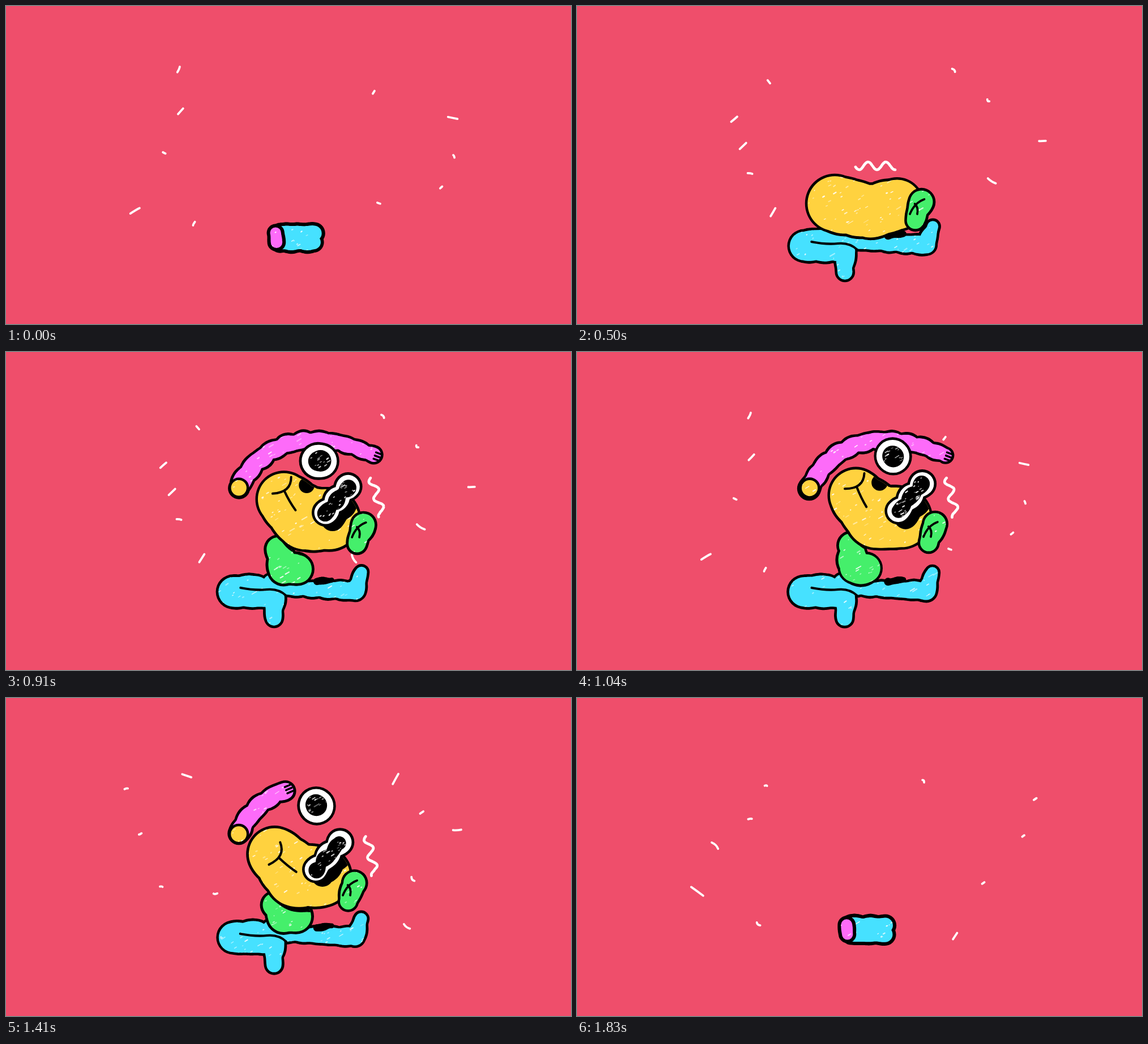
These frames come from a looping animation (998x561 px, 1870 ms). An HTML page with a canvas:

```html
<!DOCTYPE html>
<html lang="en">
<head>
<meta charset="utf-8">
<title>Unfolding doodle</title>
<style>
  html, body { margin: 0; width: 100%; height: 100%; overflow: hidden; background: #ef4e6b; }
  canvas { display: block; width: 998px; height: 561px; }
</style>
</head>
<body>
<canvas id="stage" width="998" height="561"></canvas>
<script>
const g = document.getElementById('stage').getContext('2d');
const LOOP = 1870, FRAME = 1000 / 24;
const BACK = '#ef4e6b', CYAN = '#46e1ff', YELLOW = '#ffd23f', GREEN = '#45ef6b', PINK = '#fd6bf9';
let frame = 0;

const mix = (a, b, u) => Array.isArray(a) ? a.map((v, i) => mix(v, b[i], u)) : a + (b - a) * u;
const linear = (from, to) => Math.max(0, Math.min(1, (frame - from) / (to - from)));
const ease = (from, to) => { const u = linear(from, to); return u * u * (3 - 2 * u); };
const shift = (joints, dx, dy) => joints.map(([x, y, ...r]) => [x + dx, y + dy, ...r]);
const scale = (joints, cx, cy, k) => joints.map(([x, y, r]) => [mix(cx, x, k), mix(cy, y, k), r * k]);

function random(seed) {
  return () => {
    seed = (seed + 0x6d2b79f5) | 0;
    let t = Math.imul(seed ^ (seed >>> 15), 1 | seed);
    t = (t + Math.imul(t ^ (t >>> 7), 61 | t)) ^ t;
    return ((t ^ (t >>> 14)) >>> 0) / 4294967296;
  };
}

// Every part is a chain of joints [x, y, radius]; head parts have low, front and raised poses.
const FRONT_LEG = [[401, 423, 28], [440, 422, 30], [474, 432, 20], [473, 470, 15]];
const BACK_LEG = [[470, 410, 20], [525, 418, 14], [617, 421, 18], [628, 389, 12]];
const HEAD = [
  [[456, 349, 51], [518, 363, 48], [566, 350, 46]],
  [[479, 316, 56], [522, 323, 60], [555, 320, 54]],
  [[492, 253, 48], [530, 291, 57], [573, 293, 54]]
];
const EAR = [[[608, 345]], [[624, 312]], [[632, 304]]];
const NECK = [
  [[466, 394, 19], [503, 396, 18], [541, 394, 18]],
  [[484, 342, 23], [490, 381, 29], [512, 382, 28]]
];
const FAR_EYE = [[[500, 267, 20], [543, 264, 20]], [[557, 184, 28], [558, 185, 28]]];
const NEAR_EYE = [[[540, 307, 22], [556, 281, 20]], [[568, 281, 20], [610, 233, 20]]];
const BROW_SHADE = [[[503, 285, 11]], [[534, 230, 15]]];
const LAP_SHADE = [[549, 405, 7], [576, 402, 5]];
const ARM = [[411, 240], [440, 175], [520, 120], [650, 182]];

// Union of circles swept along the joints, with a seeded wobble.
function tube(joints, grow, seed, wobble = .7, lobes = 0) {
  const path = new Path2D(), rnd = random(seed * 977 + frame * 7919);
  const a = rnd() * 7, b = rnd() * 7, c = rnd() * 7;
  const dot = (x, y, r, s) => {
    const size = Math.max(.1, r + grow + wobble * Math.sin(s * .24 + a));
    x += wobble * Math.sin(s * .17 + b);
    y += wobble * Math.sin(s * .2 + c);
    path.moveTo(x + size, y);
    path.arc(x, y, size, 0, Math.PI * 2);
  };
  let travelled = 0;
  for (let i = 0; i < Math.max(1, joints.length - 1); i++) {
    const p = joints[i], q = joints[i + 1] || p;
    const len = Math.hypot(q[0] - p[0], q[1] - p[1]), steps = Math.ceil(len / 1.5) || 1;
    for (let k = 0; k <= steps; k++) {
      const t = k / steps, [x, y, r] = mix(p, q, t);
      dot(x, y, r * (1 + lobes * Math.cos(4 * Math.PI * t)), travelled + len * t);
    }
    travelled += len;
  }
  return path;
}

function fill(path, color) {
  g.fillStyle = color;
  g.fill(path);
}

function line(points, color, width) {
  const rnd = random(points[0][0] | 0 + frame);
  g.strokeStyle = color;
  g.lineWidth = width;
  g.beginPath();
  points.forEach(([x, y], i) => {
    const next = points[i + 1];
    x += rnd() - .5;
    if (!i) g.moveTo(x, y);
    else if (next && i < points.length - 2) g.quadraticCurveTo(x, y, (x + next[0]) / 2, (y + next[1]) / 2);
    else if (next) g.quadraticCurveTo(x, y, ...next);
    else if (i === 1) g.lineTo(x, y);
  });
  g.stroke();
}

// Chalky flecks scattered around the joints.
function flecks(joints, seed, spread) {
  const rnd = random(seed * 131 + frame * 613);
  const edge = (axis, side) => Math[side < 0 ? 'min' : 'max'](...joints.map(j => j[axis] + side * j[2]));
  const x0 = edge(0, -1), y0 = edge(1, -1), w = edge(0, 1) - x0, h = edge(1, 1) - y0;
  for (let i = w * h / spread; i > 0; i--) {
    const x = x0 + rnd() * w, y = y0 + rnd() * h, len = 1 + rnd() * rnd() * 8;
    line([[x, y], [x + len, y - len * .6]], `rgba(255,255,255,${.35 + rnd() * .6})`, 1 + rnd() * 1.3);
  }
}

// One outlined shape made of one or more chains.
function shape(chains, color, seed, { ink = 4.6, wobble = .7, lobes = 0, spread = 330, extra } = {}) {
  const skin = new Path2D();
  chains.forEach((chain, i) => fill(tube(chain, ink / 2, seed + i, wobble, lobes), '#000'));
  chains.forEach((chain, i) => skin.addPath(tube(chain, -ink / 2, seed + i, wobble * .8, lobes)));
  fill(skin, color);
  g.save();
  g.clip(skin);
  if (spread) flecks(chains.flat(), seed, spread);
  if (extra) extra();
  g.restore();
}

function drawDashes() {
  const set = [0, 1, 2, 3, 2][Math.floor(frame / 5) % 5], rnd = random(40 + set);
  for (let i = 0; i < 10; i++) {
    const side = i % 2 ? 1 : -1, slot = (Math.floor(i / 2) + .2 + rnd() * .6) / 5;
    const angle = (slot - .5) * 2.3, reach = .6 + .4 * rnd();
    const x = 505 + side * 340 * reach * Math.cos(angle), y = 255 + 200 * reach * Math.sin(angle);
    const turn = (rnd() - .5) * 2.4, half = 2 + rnd() * rnd() * 14, bend = (rnd() - .5) * 5;
    const dx = half * Math.cos(turn), dy = half * Math.sin(turn);
    line([[x - dx, y - dy], [x + bend, y - bend], [x + dx, y + dy]], '#fff', 3.8);
  }
}

function drawLegs() {
  const open = ease(2, 8) - ease(36, 40), ink = mix(6, 4.6, open);
  const folded = y => FRONT_LEG.map((_, i) => [484 + i * 20, y, 16]);
  const legs = [mix(folded(417), FRONT_LEG, open), mix(folded(401), BACK_LEG, open)];
  shape(legs, CYAN, 11, { ink });
  if (open < .3) {
    const end = scale([[476, 400, 13], [478, 417, 13]], 460, 410, 1 - open * 3);
    shape([end], PINK, 17, { ink, wobble: .4 });
  }
  if (open > .7) line([[414, 416], [440, 421], [482, 417], [495, 430]], '#000', 4.2);
}

function drawArm() {
  const reach = linear(13, 22) - linear(30, 38);
  if (reach <= 0) return;
  const drop = 1 - ease(18, 22), chain = [];
  for (let i = 0; i <= 8; i++) {
    const t = reach * i / 8;
    let p = ARM;
    while (p.length > 1) p = p.slice(1).map((q, k) => mix(p[k], q, t));
    const [x, y] = p[0];
    chain.push([x - 22 * drop, y + 52 * drop * (1 - t), (18 - 4 * t) * Math.min(1, reach * 2)]);
  }
  shape([chain], PINK, 23, { wobble: 1 });
  const [x, y] = chain[8], angle = Math.atan2(y - chain[7][1], x - chain[7][0]);
  if (frame > 19 && reach > .3) {
    const c = Math.cos(angle), s = Math.sin(angle);
    for (const k of [-6, 0, 6]) line([[x - s * k + c * 2, y + c * k + s * 2], [x - s * k + c * 13, y + c * k + s * 13]], '#000', 3.6);
  }
  shape([[[chain[0][0], chain[0][1], chain[0][2] * .9]]], YELLOW, 29, { wobble: .3 });
}

function drawEye(chain, seed) {
  shape([chain], '#fff', seed, { lobes: .12, spread: 0 });
  const pupil = chain.map(([x, y, r]) => [x, y, r * .58]);
  shape([pupil], '#000', seed + 1, { ink: 1, wobble: 1.3, lobes: .1, spread: 80 });
}

function drawMouth(x, y, degrees) {
  g.save();
  g.translate(x, y);
  g.rotate(degrees * Math.PI / 180);
  line([[-5, -27], [12, -5], [-14, 16]], '#000', 4);
  line([[0, 0], [18, 10], [36, 16]], '#000', 4);
  g.restore();
}

function drawWave(x, y, degrees) {
  const a = degrees * Math.PI / 180, points = [];
  for (let s = -35; s <= 35; s += 2) {
    const v = 7 * Math.sin(s * .2 + 1);
    points.push([x + s * Math.cos(a) - v * Math.sin(a), y + s * Math.sin(a) + v * Math.cos(a)]);
  }
  line(points, '#fff', 4.8);
}

function drawFigure() {
  const grow = ease(6, 12) - ease(36, 38.5);
  if (grow <= 0) return;
  const away = ease(34, 36.5), turn = ease(12, 18) - away, rise = ease(18, 23) - away;
  const sink = ease(29, 34) - away, dx = -17 * sink, dy = 22 * sink;
  const raise = pair => mix(pair[0], pair[1], Math.max(0, rise));
  const pose = ([low, front, up]) => shift(raise([mix(low, front, turn), up]), dx, dy);
  const small = joints => scale(joints, 510, 405, grow);

  const head = small(pose(HEAD));
  if (grow > .7) fill(tube(LAP_SHADE, 0, 31), '#000');
  if (turn > 0) {
    const [top, ...base] = raise(NECK);
    const neck = [...shift([top], dx / 2, dy), ...shift(base, 0, dy / 5)].map(([x, y, r]) => [x, y, r * turn]);
    shape([neck], GREEN, 37, {
      wobble: 1.2, extra: () => fill(tube(shift(head.slice(1), 7, 8), 0, 38), '#000')
    });
  }

  const open = Math.max(0, ease(13, 17) - ease(34, 36.5));
  const near = scale(shift(raise(NEAR_EYE), dx * 1.2, dy), 530, 310, open);
  const far = scale(shift(raise(FAR_EYE), dx / 2, dy / 4), 530, 310, open);
  shape([head], YELLOW, 41, {
    extra: () => {
      if (!open) return;
      fill(tube(shift(near, 12, 11), 0, 43), '#000');
      fill(tube(scale(raise(BROW_SHADE), 530, 310, open * (1 - sink)), 0, 44), '#000');
    }
  });
  if (open > .3) {
    const [[x, y]] = raise([[[471, 306]], [[494, 238]]]);
    drawMouth(x + dx * .7, y + dy * 2, 40 * rise - 25 * sink);
  }

  const [[ex, ey]] = small(pose(EAR));
  shape([scale([[ex, ey, 22], [ex - 11, ey + 33, 17]], ex, ey, grow)], GREEN, 47);
  if (grow > .7) {
    line(shift([[5, -4], [-12, 2], [-20, 22]], ex, ey), '#000', 3.8);
    line(shift([[-11, 4], [-4, 10], [-7, 22]], ex, ey), '#000', 3.8);
  }

  drawArm();
  if (open) {
    drawEye(far, 53);
    drawEye(near, 59);
  }
  if (grow > .7) {
    const [[x, y, tilt]] = pose([[[527, 282, 0]], [[598, 250, 42]], [[662, 256, 78]]]);
    drawWave(x, y, tilt);
  }
}

function draw() {
  fill(new Path2D('M0 0H998V561H0Z'), BACK);
  g.lineCap = g.lineJoin = 'round';
  drawDashes();
  drawLegs();
  drawFigure();
}

let shown = -1;
function tick() {
  // Drawing times are whole hundredths of a second.
  const t = Math.floor(performance.now() % LOOP / 10) * 10;
  frame = Math.min(44, Math.floor((t + 9.9) / FRAME));
  if (frame !== shown) draw();
  shown = frame;
  requestAnimationFrame(tick);
}
tick();
</script>
</body>
</html>
```
